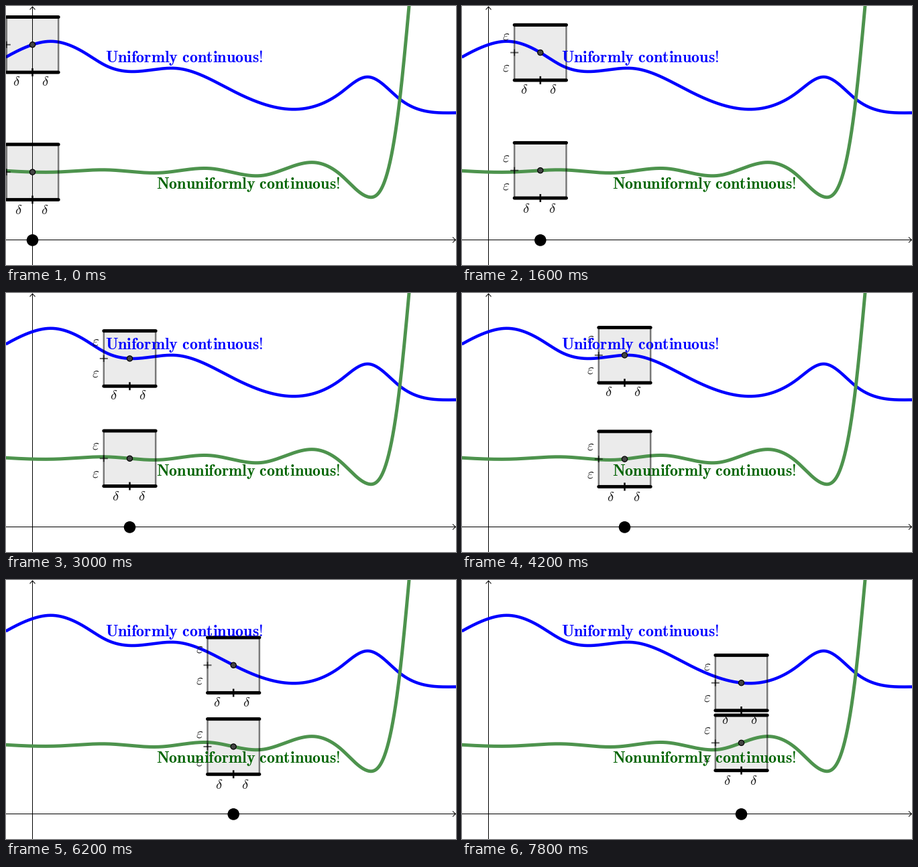
A matplotlib script that plays this animation: 671 px wide and 387 px high, repeating every 8000 ms.

```python
import numpy as np
import matplotlib.pyplot as plt
from matplotlib.animation import FuncAnimation
from matplotlib.patches import Circle, Rectangle
from matplotlib.transforms import Affine2D

plt.rcParams["mathtext.fontset"] = "cm"
plt.rcParams["path.snap"] = False

W, H, DPI = 671, 387, 100
PX = 72 / DPI
FRAMES, STEP = 40, 200
AXIS_X, AXIS_Y = 39.5, 349.5
SPEED = 9.667
DELTA, EPS = 38.7, 41.3
BLUE, GREEN, PALE_GREEN = "#0000ff", "#006400", "#4d934d"


def spline(*points):
    """Natural cubic spline through the given points."""
    x, y = np.array(points, float).T
    n, h = len(x), np.diff(x)
    a, b = np.eye(n), np.zeros(n)
    for i in range(1, n - 1):
        a[i, i - 1:i + 2] = h[i - 1], 2 * (h[i - 1] + h[i]), h[i]
        b[i] = 6 * ((y[i + 1] - y[i]) / h[i] - (y[i] - y[i - 1]) / h[i - 1])
    m = np.linalg.solve(a, b)

    def f(t):
        i = np.clip(np.searchsorted(x, t) - 1, 0, n - 2)
        l, r = x[i + 1] - t, t - x[i]
        return ((m[i] * l**3 + m[i + 1] * r**3) / (6 * h[i])
                + (y[i] / h[i] - m[i] * h[i] / 6) * l
                + (y[i + 1] / h[i] - m[i + 1] * h[i] / 6) * r)
    return f


# Turning points of each curve, with a slope point where the bend is uneven
uniform = spline(
    (-20, 88), (0, 76.3), (39.5, 57.8), (68, 52.8), (117, 69.7), (150, 89.6),
    (190, 98), (256, 93.3), (339, 127.2), (433, 154.3), (500, 129),
    (540, 106), (587, 139), (657, 159.7), (690, 159))
nonuniform = spline(
    (-20, 245), (78, 248), (152, 244.9), (230, 249.2), (305, 242.8),
    (383, 253.2), (460, 233.8), (500, 253), (540, 285.2), (570, 244),
    (587, 141), (601, 0), (608, -78))

fig = plt.figure(figsize=(W / DPI, H / DPI), dpi=DPI, facecolor="white")
ax = fig.add_axes([0, 0, 1, 1])
ax.set(xlim=(0, W), ylim=(H, 0))
ax.axis("off")


def line(xs, ys, width, color="black", z=2, cap="butt", **kw):
    ax.plot(xs, ys, lw=width * PX, color=color, zorder=z,
            solid_capstyle=cap, snap=False, **kw)


def label(x, y, text, size, color, z, **kw):
    ax.text(x, y, f"${text}$", fontsize=size * PX, color=color, zorder=z, **kw)


def make_box(eps_mid, eps_gap, delta_mid, delta_gap, delta_y):
    """Epsilon-delta box around (0, 0); returns the transform that moves it."""
    shift = Affine2D()
    tr = shift + ax.transData
    ax.add_patch(Rectangle((-DELTA, -EPS), 2 * DELTA, 2 * EPS, lw=0,
                           fc="#ebebeb", zorder=1, snap=False, transform=tr))
    style = dict(ha="center", va="center", transform=tr)
    for s in (-1, 1):
        line([s * DELTA] * 2, [-EPS, EPS], 2.5, z=4, alpha=0.5, transform=tr)
        line([-DELTA, DELTA], [s * EPS] * 2, 5, z=5, cap="round", transform=tr)
        label(-51, eps_mid + s * eps_gap, r"\varepsilon", 21.5, "#101010", 6,
              **style)
        label(delta_mid + s * delta_gap, delta_y, r"\delta", 20.7, "#101010",
              6, **style)
    line([0, 0], [EPS - 6, EPS + 6], 2.5, z=5, transform=tr)
    for dx, dy in ((6, 0), (0, 5)):
        line([-DELTA - dx, -DELTA + dx], [-dy, dy], 2, z=5, alpha=0.6,
             transform=tr)
    ax.add_patch(Circle((0, 0), 4.1, fc="#444444", ec="black", lw=1.2 * PX,
                        zorder=6, transform=tr))
    return shift


# Axes with open arrowheads
line([0, W - 1], [AXIS_Y] * 2, 1)
line([AXIS_X] * 2, [H, 1], 1)
line([W - 5, W - 0.5, W - 5], [AXIS_Y - 4, AXIS_Y, AXIS_Y + 4], 1)
line([AXIS_X - 4, AXIS_X, AXIS_X + 4], [5.5, 1, 5.5], 1)

xs = np.linspace(-10, W + 5, 1200)
line(xs, uniform(xs), 4.5, BLUE, 3)
xs = np.linspace(-10, 606, 1200)
line(xs, nonuniform(xs), 5, PALE_GREEN, 3)

label(148, 84, r"\mathbf{Uniformly\ continuous!}", 24.1, BLUE, 7)
label(224, 272.5, r"\mathbf{Nonuniformly\ continuous!}", 24.1, GREEN, 7)

boxes = [(uniform, make_box(-1.5, 23.5, -2.5, 21.6, 55.5)),
         (nonuniform, make_box(1.5, 21, -1.5, 19.5, 57))]
dot = ax.add_patch(Circle((AXIS_X, AXIS_Y), 8.8, fc="black", lw=0, zorder=6))


def update(i):
    x = AXIS_X + SPEED * i
    for f, shift in boxes:
        shift.clear().translate(x, float(f(x)))
    dot.center = x, AXIS_Y + 0.4
    return []


anim = FuncAnimation(fig, update, frames=FRAMES, interval=STEP,
                     repeat=True, repeat_delay=0, blit=False)
plt.show()
```
